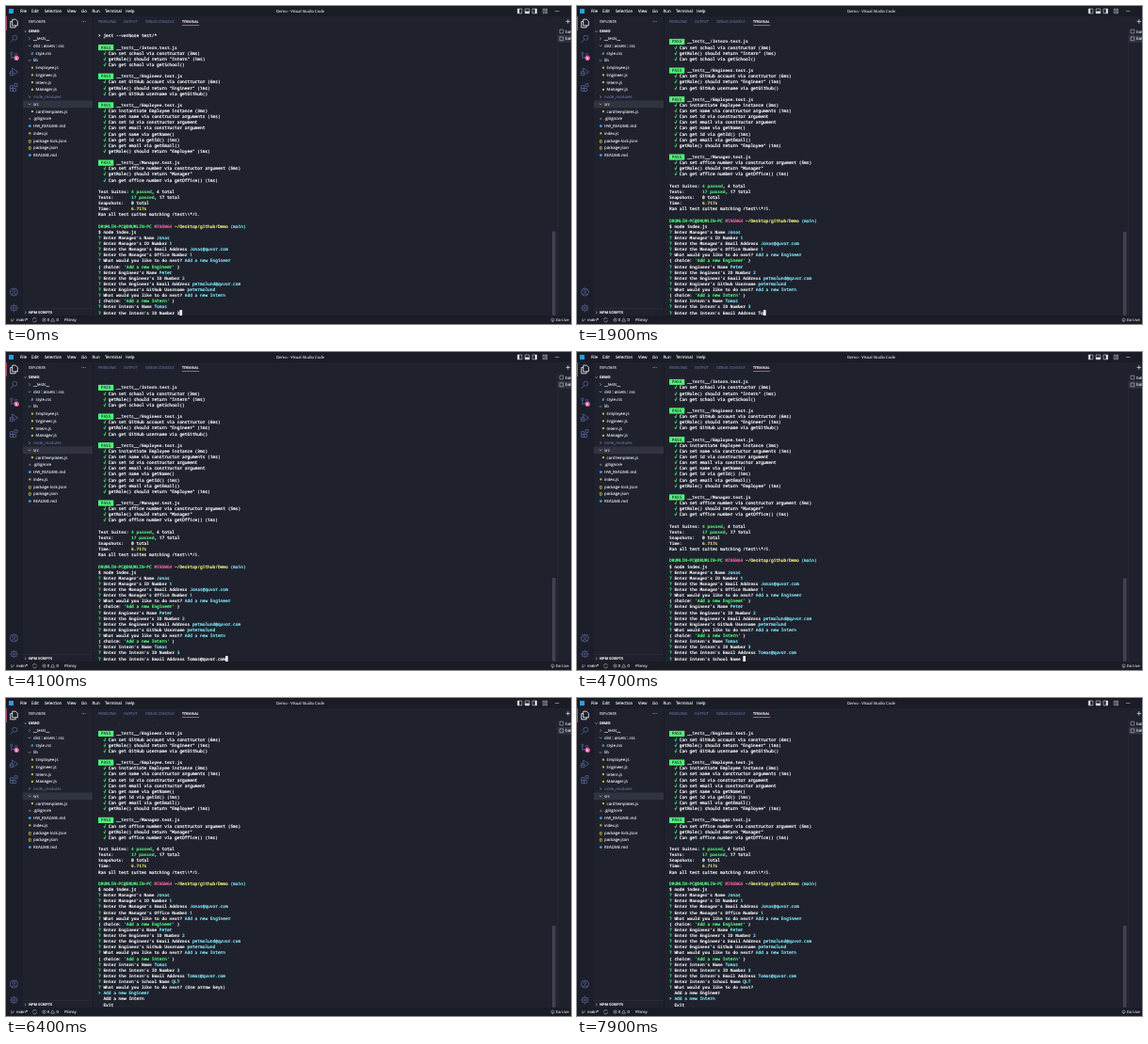
Recreate the animation shown at these times as an HTML page. Size 600 px wide and 338 px high, loop 8 s.

```html
<!DOCTYPE html>
<html lang="en">
<head>
<meta charset="utf-8">
<title>Terminal session</title>
<style>
  html, body { margin: 0; width: 100%; height: 100%; overflow: hidden; background: #1f222d; }
  svg { display: block; width: 100vw; height: 100vh; }
  text { white-space: pre; text-rendering: geometricPrecision; }
  .ui { font-family: "Open Sans", "Noto Sans", sans-serif; font-size: 4.3px; }
  .ui, .term text { fill: currentColor; stroke: currentColor; stroke-width: .12px; }
  .term { font-family: "Noto Sans Mono", "DejaVu Sans Mono", monospace; font-size: 4.5px; }
  .term text { stroke-width: .22px; }
  .term .b, .term .G, .term .Y, .term .k { font-weight: 700; stroke-width: .06px; }
  .n { color: #f4f5f7; }
  .b { color: #fafafc; }
  .d { color: #d4d7df; }
  .g, .G { color: #50fa7b; }
  .c { color: #7fe6f6; }
  .y, .Y { color: #f1f07c; }
  .m { color: #e8609f; }
  .k { color: #255a37; }
  .icon { fill: none; stroke: #56639a; stroke-width: .8; }
  .thin { fill: none; stroke: #c3c6d2; stroke-width: .55; }
</style>
</head>
<body>
<svg id="stage" viewBox="0 0 600 338" preserveAspectRatio="none">
  <defs><clipPath id="view"><rect x="93" y="28.7" width="486" height="300.3"/></clipPath></defs>
  <rect width="600" height="338" fill="#1f222d"/>
  <rect width="600" height="11" fill="#1a1c26"/>
  <rect y="11" width="17" height="318" fill="#1c1f29"/>
  <rect y="329" width="600" height="9" fill="#1a1c26"/>
  <g id="chrome"></g>
  <g clip-path="url(#view)"><g id="lines" class="term"></g></g>
  <rect id="bar" x="580" width="3.6" fill="#3f4250"/>
</svg>
<script>
const NS = "http://www.w3.org/2000/svg";
const $ = id => document.getElementById(id);

function add(parent, tag, attrs, text) {
  const el = document.createElementNS(NS, tag);
  for (const k in attrs) el.setAttribute(k, attrs[k]);
  if (text !== undefined) el.textContent = text;
  parent.appendChild(el);
  return el;
}

// ---------- window frame ----------
const chrome = $("chrome");
const label = (x, y, s, size = 4.3, color = "#dcdee6", weight = 400) =>
  add(chrome, "text", { class: "ui", x, y: y + size * .36,
    style: `font-size:${size}px;color:${color};font-weight:${weight}` }, s);
const box = (x, y, width, height, fill) => add(chrome, "rect", { x, y, width, height, fill });
const path = (d, cls = "thin", style = "") => add(chrome, "path", { d, class: cls, style });
const chevron = (x, y, open) =>
  path(open ? `M${x - 1.3} ${y - .7}l1.3 1.4 1.3-1.4` : `M${x - .7} ${y - 1.3}l1.4 1.3-1.4 1.3`);

box(3, 3, 5, 5, "#2b9be6");
[["File", 15], ["Edit", 27], ["Selection", 40.7], ["View", 65], ["Go", 80], ["Run", 91.5],
 ["Terminal", 105], ["Help", 127]].forEach(([s, x]) => label(x, 5.5, s, 4.4, "#eceef3"));
label(287, 5.5, "Demo - Visual Studio Code", 4.15, "#d6d8e0");

[543.3, 551.2, 559].forEach((x, i) => {
  path(`M${x} 3h4.6v4.8h-4.6z`, "thin", "stroke:#e8eaf0");
  if (i == 0) box(x, 3, 1.9, 4.8, "#e8eaf0");
  if (i == 1) box(x, 5.6, 4.6, 2.2, "#e8eaf0");
  if (i == 2) box(x + 2.7, 3, 1.9, 4.8, "#e8eaf0");
});
path("M570.2 3h1.7v4.8h-1.7zM572.9 3h1.7v1.9h-1.7zM572.9 5.9h1.7v1.9h-1.7z");
path("M583 5.5h4.4");

// activity icons
box(0, 11, .8, 15, "#c2567f");
path("M6.7 14.2h3.6l2 2v4.6h-5.6zM6.7 16.5h-2v6.3h5.4v-2", "icon", "stroke:#f4f5f9");
path("M11.8 33.7a2.5 2.5 0 1 1-5 0a2.5 2.5 0 1 1 5 0M7.5 35.6l-3 3.2", "icon");
path("M7 50.3a1.2 1.2 0 1 1-2.4 0a1.2 1.2 0 1 1 2.4 0M5.8 51.5v4.6M11.8 51.6a1.2 1.2 0 1 1-2.4 0a1.2 1.2 0 1 1 2.4 0M10.6 52.8q-.2 2-4.6 2", "icon");
add(chrome, "circle", { cx: 11.2, cy: 55.3, r: 2.6, fill: "#f0609f" });
label(10.1, 55.3, "5", 3.4, "#fff", 700);
path("M6.6 66v3M6.6 66l6 4-4 2.7M3.8 71.3h4.6M4.4 69.6h3.4v4h-3.4z", "icon");
path("M4.6 84.6h3v3h-3zM4.6 87.6h3v3h-3zM7.6 87.6h3v3h-3zM9 82.7h3v3h-3z", "icon");
path("M12.4 304a4 4 0 1 1-8 0a4 4 0 1 1 8 0M9.8 302.7a1.4 1.4 0 1 1-2.8 0a1.4 1.4 0 1 1 2.8 0M5.8 306.8q2.6-3 5.2 0", "icon");
path("M11.3 321a2.9 2.9 0 1 1-5.8 0a2.9 2.9 0 1 1 5.8 0M9.4 321a1 1 0 1 1-2 0a1 1 0 1 1 2 0", "icon");
path("M8.4 316.7v1.4M8.4 323.9v1.4M4.1 321h1.4M11.3 321h1.4M5.4 318l1 1M10.4 323l1 1M5.4 324l1-1M10.4 319l1-1", "icon");

// explorer
label(24, 16.5, "EXPLORER", 3.7, "#d0d3dc");
[81, 82.6, 84.2].forEach(cx => add(chrome, "circle", { cx, cy: 16.5, r: .45, fill: "#d0d3dc" }));
chevron(20.7, 27, true);
label(24, 27, "DEMO", 3.8, "#f2f3f6", 700);

const icons = {
  js: (x, y) => box(x + .3, y - 1, 2, 2, "#cdb94c"),
  json: (x, y) => label(x - .3, y, "{}", 4, "#d8c650", 700),
  css: (x, y) => label(x, y, "#", 4, "#4a9fe0", 700),
  md: (x, y) => add(chrome, "circle", { cx: x + 1.3, cy: y, r: 1.4, fill: "#4a9fe0" }),
  gitignore: (x, y) => box(x + .3, y - 1, 2, 2, "#5d6880")
};
// "+" open folder, "-" closed folder, leading space = nested file
const tree = ["-__tests__", "+dist \u2236 assets \u2236 css", " style.css", "+lib", " Employee.js",
  " Engineer.js", " Intern.js", " Manager.js", "-node_modules", "+src", " cardTemplates.js",
  ".gitignore", "HW_README.md", "index.js", "package-lock.json", "package.json", "README.md"];
tree.forEach((entry, i) => {
  const y = 34.6 + i * 7.75, mark = entry[0], nested = mark == " " ? 2.6 : 0;
  const name = entry.replace(/^[-+ ]/, "");
  if (name == "src") box(17.5, y - 3.9, 74.5, 7.8, "#303440");
  if (mark == "+" || mark == "-") chevron(25, y, mark == "+");
  else icons[name.split(".").pop()](24 + nested, y);
  label(29 + nested, y, name, 4.3, name == "node_modules" ? "#636a94" : "#e2e4ea");
});
box(17, 321.3, 75.5, .6, "#2c303c");
chevron(20.7, 325.8, false);
label(24, 325.8, "NPM SCRIPTS", 3.8, "#f2f3f6", 700);
box(17, 11, .5, 318, "#191b24");
box(92.2, 11, .6, 318, "#171922");

// panel tabs
[["PROBLEMS", 98], ["OUTPUT", 125], ["DEBUG CONSOLE", 148.3]].forEach(([s, x]) =>
  label(x, 16.6, s, 3.7, "#5f6896"));
label(187, 16.6, "TERMINAL", 3.7, "#f8f8fa");
box(187, 20.2, 18.2, .8, "#e0609a");

// terminal list on the right
box(585.3, 22, .6, 307, "#2a2d39");
box(586, 30.8, 14, 7.8, "#303440");
[27, 34.8].forEach(y => {
  path(`M588 ${y - 1.9}h3.8v3.8h-3.8z`);
  label(594, y, "bash");
});
path("M594.6 16.4h4.4M596.8 14.2v4.4", "thin", "stroke:#eceef3;stroke-width:.7");

// status bar
path("M5.9 332v3.6M8.4 332.4v.8q0 1.2-2.5 1.4");
label(11, 333.6, "main*", 4.2);
path("M28.4 333.4a2 2 0 0 1 3.9-.5M32.4 334a2 2 0 0 1-3.9.5");
path("M42.2 333.6a1.7 1.7 0 1 1-3.4 0a1.7 1.7 0 1 1 3.4 0M39.8 332.9l1.4 1.4M41.2 332.9l-1.4 1.4");
label(43.8, 333.6, "0", 4.2);
path("M49.6 331.8l2 3.4h-4z");
label(53.4, 333.6, "0", 4.2);
label(62, 333.6, "Plimsy", 4.2);
path("M582.2 333.6a1.6 1.6 0 1 1-3.2 0a1.6 1.6 0 1 1 3.2 0M580.6 333.6v2.2");
label(583.8, 333.6, "Go Live", 4.1);

// ---------- terminal ----------
const X = 98, CW = 2.7, PITCH = 6.13, BOTTOM = 326.1, FIRST_LIVE = 48;
const lines = $("lines");
const colX = col => X + col * CW;

function draw(parent, row, parts) {
  const y = row * PITCH;
  let col = 0;
  for (const [cls, s] of parts) {
    if (cls == "k") add(parent, "rect", { x: colX(col), y: y - 3.1, width: s.length * CW, height: 6.1, fill: "#50fa7b" });
    add(parent, "text", { class: cls, x: colX(col), y: y + 1.5 }, s);
    col += s.length;
  }
  return col;
}

const suite = (name, ...tests) => [
  [["k", " PASS "], ["d", " __tests__/"], ["b", name + ".test.js"]],
  ...tests.map(s => [["g", "  \u221a "], ["n", s]]), []];
const ask = (q, a = "", cls = "c") => [["g", "? "], ["b", q + " "], [cls, a]];
const choice = s => [["n", "{ choice: "], ["g", `'${s}'`], ["n", " }"]];
const NEXT = "What would you like to do next?", ENG = "Add a new Engineer", INT = "Add a new Intern";
const MAIL = "@quvor.com";

const history = [
  [["n", "> jest --verbose test/*"]], [],
  ...suite("Intern", "Can set school via constructor (3ms)",
    'getRole() should return "Intern" (1ms)', "Can get school via getSchool()"),
  ...suite("Engineer", "Can set GitHub account via constructor (6ms)",
    'getRole() should return "Engineer" (1ms)', "Can get GitHub username via getGithub()"),
  ...suite("Employee", "Can instantiate Employee instance (3ms)",
    "Can set name via constructor arguments (1ms)", "Can set id via constructor argument",
    "Can set email via constructor argument", "Can get name via getName()",
    "Can get id via getId() (1ms)", "Can get email via getEmail()",
    'getRole() should return "Employee" (1ms)'),
  ...suite("Manager", "Can set office number via constructor argument (5ms)",
    'getRole() should return "Manager"', "Can get office number via getOffice() (1ms)"),
  [["b", "Test Suites: "], ["G", "4 passed"], ["n", ", 4 total"]],
  [["b", "Tests:       "], ["G", "17 passed"], ["n", ", 17 total"]],
  [["b", "Snapshots:   "], ["n", "0 total"]],
  [["b", "Time:        "], ["Y", "6.717s"]],
  [["n", "Ran all test suites matching /test\\\\*/i."]], [],
  [["g", "DRUMLIN-PC@DRUMLIN-PC "], ["m", "MINGW64 "], ["y", "~/Desktop/github/Demo "], ["c", "(main)"]],
  [["n", "$ node index.js"]],
  ask("Enter Manager's Name", "Jonas"),
  ask("Enter Manager's ID Number", "1"),
  ask("Enter the Manager's Email Address", "Jonas" + MAIL),
  ask("Enter the Manager's Office Number", "1"),
  ask(NEXT, ENG), choice(ENG),
  ask("Enter Engineer's Name", "Peter"),
  ask("Enter the Engineer's ID Number", "2"),
  ask("Enter the Engineer's Email Address", "petmolund" + MAIL),
  ask("Enter Engineer's Github Username", "petermolund"),
  ask(NEXT, INT), choice(INT),
  ask("Enter Intern's Name", "Tomas")
];
history.forEach((parts, row) => draw(lines, row, parts));
const live = add(lines, "g", {});

// each prompt: question, answer, typing start, ms per key, time of Enter
const prompts = [
  ["Enter the Intern's ID Number", "3", -500, 100, 500],
  ["Enter the Intern's Email Address", "Tomas" + MAIL, 1720, 90, 4600],
  ["Enter Intern's School Name", "QLT", 5650, 150, 6400]
];
const MOVE = 7600;

function rowsAt(t) {
  const rows = [];
  for (const [q, a, start, step, enter] of prompts) {
    if (t < enter) {
      const n = Math.max(0, Math.floor((t - start) / step));
      rows.push(ask(q, a.slice(0, n), "n"));
      return { rows, typing: true };
    }
    rows.push(ask(q, a));
  }
  const moved = t >= MOVE;
  const item = (s, on) => on ? [["c", "> " + s]] : [["n", "  " + s]];
  rows.push(ask(NEXT, moved ? "" : "(Use arrow keys)", "n"),
    item(ENG, !moved), item(INT, moved), item("Exit", false));
  return { rows, typing: false };
}

let shown = "";
function render(t) {
  const state = rowsAt(t), key = JSON.stringify(state);
  if (key == shown) return;
  shown = key;
  live.replaceChildren();
  let end = 0;
  state.rows.forEach((parts, i) => end = draw(live, FIRST_LIVE + i, parts));
  const last = FIRST_LIVE + state.rows.length - 1;
  if (state.typing)
    add(live, "rect", { x: colX(end), y: last * PITCH - 3, width: CW, height: 5.9, fill: "#f4f5f7" });
  lines.setAttribute("transform", `translate(0 ${BOTTOM - last * PITCH})`);
  const top = 239.6 + (last - FIRST_LIVE) * .4;
  $("bar").setAttribute("y", top);
  $("bar").setAttribute("height", 328.8 - top);
}

function tick(now) {
  render(now % 8000);
  requestAnimationFrame(tick);
}
render(0);
requestAnimationFrame(tick);
</script>
</body>
</html>
```
